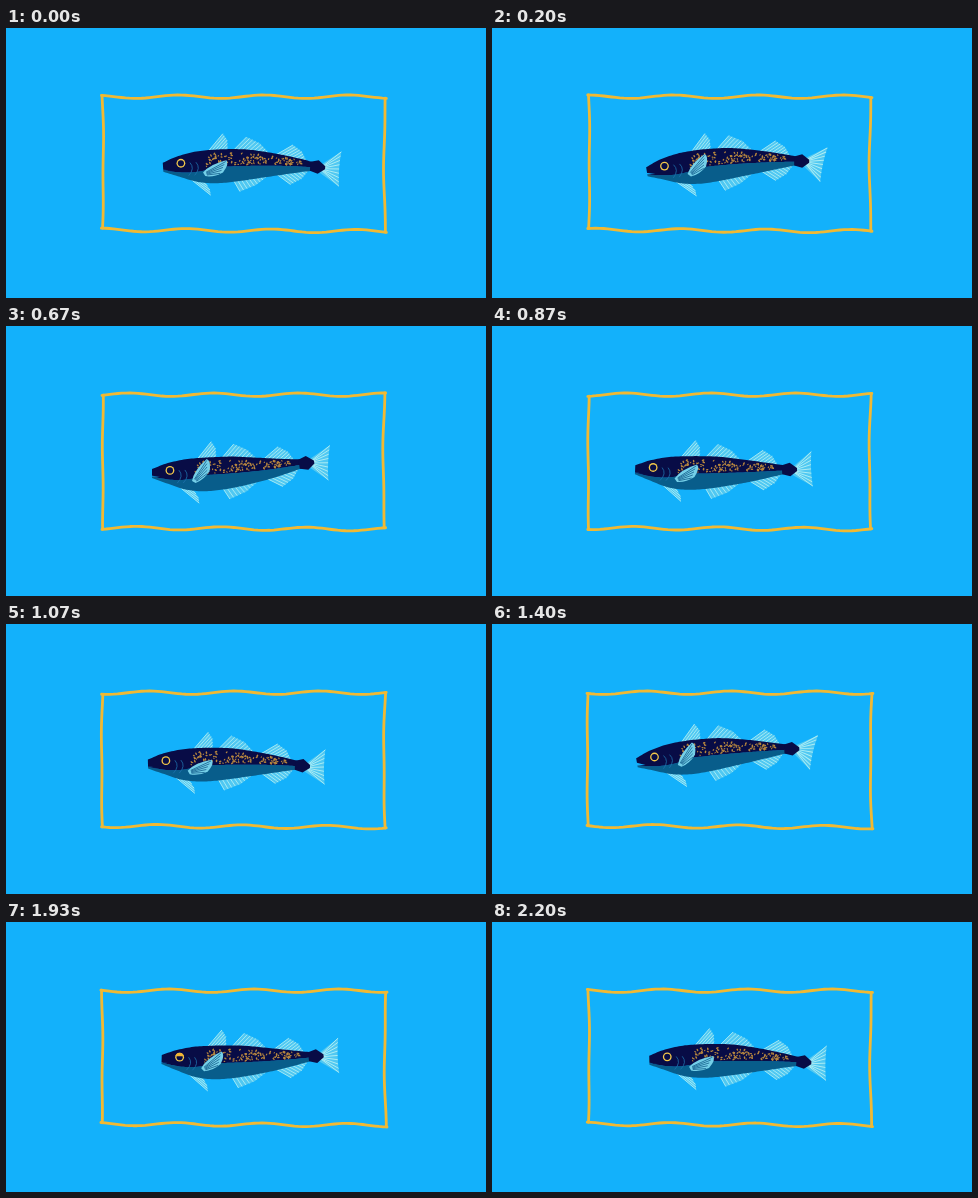
An HTML page with a canvas for the animation above (2270 ms loop, 480x270 px).

```html
<!DOCTYPE html>
<html lang="en">
<head>
<meta charset="utf-8">
<title>Swimming fish</title>
<style>
  html, body { margin: 0; width: 100%; height: 100%; overflow: hidden; background: #13b1fb; }
  canvas { display: block; width: 100vw; height: 100vh; }
</style>
</head>
<body>
<canvas id="stage"></canvas>
<script>
const W = 480, H = 270, LOOP = 2270, STEP = 200 / 3, LAST = 33, LENGTH = 161;
const SEA = '#13b1fb', NAVY = '#080c46', TEAL = '#085d8b', FIN = '#50c8f2',
  RAY = '#aeeef4', GOLD = '#f1b933', SPOT = '#b6863f';
const { sin, cos, PI } = Math;

const canvas = document.getElementById('stage');
const ctx = canvas.getContext('2d');

// Smooth curve through a few [x, y] points
function curve(points) {
  const end = points.length - 1;
  const slope = k => {
    const a = points[Math.max(0, k - 1)], b = points[Math.min(end, k + 1)];
    return (b[1] - a[1]) / (b[0] - a[0]);
  };
  return x => {
    let i = 0;
    while (i < end - 1 && x > points[i + 1][0]) i++;
    const [x0, y0] = points[i], [x1, y1] = points[i + 1];
    const h = x1 - x0, s = Math.min(1, Math.max(0, (x - x0) / h)), q = 1 - s;
    return y0 * (1 + 2 * s) * q * q + slope(i) * h * s * q * q +
      y1 * s * s * (3 - 2 * s) - slope(i + 1) * h * s * s * q;
  };
}

// Offsets from the spine by distance from the nose
const back = curve([[0, -6.5], [15, -12], [38, -16], [78, -16], [105, -12.5], [133, -7.5], [152, -3.8]]);
const belly = curve([[0, 2.5], [12, 7], [35, 15], [60, 17], [105, 12], [152, 4]]);
const flank = u => 0.9 + 4 * sin(PI * Math.min(u, 55) / 55);

function seeded(seed) {
  return () => (seed = seed * 16807 % 2147483647) / 2147483647;
}
const rnd = seeded(417);
const spots = Array.from({ length: 120 }, () => {
  const u = 43 + 96 * rnd();
  const top = back(u) * 0.76, low = flank(u) - 1.5;
  return { u, v: top + (low - top) * rnd(), r: 0.5 + 0.35 * rnd(), tilt: rnd() * 3 };
});

const range = (n, f) => Array.from({ length: n }, (_, i) => f(i / (n - 1), i));
const mix = (a, b, s) => [a[0] + (b[0] - a[0]) * s, a[1] + (b[1] - a[1]) * s];

// The fish drifts round an ellipse once per loop and beats its tail twice
function poseAt(w) {
  const beat = 2 * w;
  const x = 149.7 + 7.5 * cos(w) - 1.7 * sin(w);
  const bob = 4.8 * sin(w);
  const y = u => {
    const s = u / LENGTH;
    const sway = -2.2 + 8.5 * s ** 3;
    const lift = 0.8 - 7 * (1 - (1 - s) ** 2.5);
    return 143.5 - 10.5 * s + bob + sway * cos(beat) + lift * sin(beat);
  };
  const at = (u, v) => {
    const a = Math.max(0, u - 4), b = Math.min(LENGTH, u + 4);
    const m = (y(b) - y(a)) / (b - a);
    return [x + u - v * m, y(Math.min(LENGTH, Math.max(0, u))) + v];
  };
  return {
    at,
    pectoral: -37 + 19 * cos(beat) - 13 * sin(beat),
    tail: 4 + 8 * sin(beat - 0.17),
    gape: Math.max(0, sin(beat - 0.7))
  };
}

function trace(points, close) {
  ctx.beginPath();
  points.forEach(p => ctx.lineTo(p[0], p[1]));
  if (close) ctx.closePath();
}
function shape(points, color) {
  trace(points, true);
  ctx.fillStyle = color;
  ctx.fill();
}
function line(points, color, width) {
  trace(points);
  ctx.strokeStyle = color;
  ctx.lineWidth = width;
  ctx.stroke();
}
function disc(p, r, color) {
  ctx.beginPath();
  ctx.arc(p[0], p[1], r, 0, 2 * PI);
  ctx.fillStyle = color;
  ctx.fill();
}
function local(p, degrees, draw) {
  ctx.save();
  ctx.translate(p[0], p[1]);
  ctx.rotate(degrees * PI / 180);
  draw();
  ctx.restore();
}

function fin(at, edge, from, to, tipU, height, rays) {
  const side = Math.sign(edge(from));
  const root = u => at(u, edge(u) - side);
  const mid = (tipU + to) / 2;
  const tip = at(tipU, edge(tipU) + side * height);
  const bulge = at(mid + 2, edge(mid) + side * height * 0.58);
  const rim = s => s < 0.5 ? mix(tip, bulge, s * 2) : mix(bulge, root(to), s * 2 - 1);
  shape([root(from), tip, bulge, root(to), root((from + to) / 2)], FIN);
  for (let i = 0; i <= rays; i++) {
    const s = i / (rays + 1);
    line([root(from + (to - from) * s), rim(s)], RAY, 0.9);
  }
}

function tailFan() {
  ctx.beginPath();
  ctx.moveTo(-6, -1);
  ctx.lineTo(16.5, -17);
  ctx.quadraticCurveTo(14, 0, 15.5, 18);
  ctx.lineTo(-6, 4);
  ctx.fillStyle = FIN;
  ctx.fill();
  range(9, k => {
    const s = k * 2 - 1;
    line([[-2, s * 2 + 1], [15 + s * s - 0.4 * s, s * 17.2 + 0.5]], RAY, 0.95);
  });
}

function pectoralFin() {
  ctx.beginPath();
  ctx.moveTo(-1, 0);
  ctx.quadraticCurveTo(8, -6, 25, -4.5);
  ctx.quadraticCurveTo(27, 0, 18, 6);
  ctx.quadraticCurveTo(8, 8, 0, 4);
  ctx.fillStyle = '#74cfe8';
  ctx.fill();
  range(5, s => line([[2, 0.5 + 3 * s], [24 - 9 * s, 9.5 * s - 3.5]], '#17618f', 0.75));
}

function eye(p, lid) {
  disc(p, 4.4, '#f5c94a');
  disc(p, 3.1, NAVY);
  if (lid <= 0) return;
  ctx.save();
  ctx.beginPath();
  ctx.rect(p[0] - 5, p[1] - 5, 10, 2 + 6.4 * lid);
  ctx.clip();
  disc(p, 4.4, '#f3b533');
  ctx.restore();
}

function fish(w, step) {
  const { at, pectoral, tail, gape } = poseAt(w);
  const run = edge => range(77, (_, i) => at(i * 2, edge(i * 2)));

  local(at(LENGTH, 0.5), tail, tailFan);
  fin(at, back, 46, 65, 61, 15.5, 5);
  fin(at, back, 71, 106, 84, 12.5, 8);
  fin(at, back, 113, 143, 129, 12, 7);
  fin(at, belly, 70, 105, 76, 10.5, 8);
  fin(at, belly, 114, 146, 128, 11, 7);
  fin(at, belly, 27, 41, 46, 12, 3);

  const middle = run(flank).reverse();
  shape([...run(belly), ...middle], TEAL);
  shape([...run(back), ...middle], NAVY);
  shape([at(147, -4.4), at(155, -6.6), at(162, -1), at(162, 2), at(155, 7), at(147, 4.6)], NAVY);
  shape([at(-1, 0.5 - 4 * gape), at(8, 1.5), at(-1, 0.8)], SEA);

  for (const s of spots) {
    ctx.beginPath();
    ctx.ellipse(...at(s.u, s.v), s.r * 1.7, s.r, s.tilt, 0, 2 * PI);
    ctx.fillStyle = SPOT;
    ctx.fill();
  }
  for (const u of [27, 33]) {
    ctx.beginPath();
    ctx.moveTo(...at(u, -5));
    ctx.quadraticCurveTo(...at(u + 5, 1), ...at(u - 2, 8));
    ctx.strokeStyle = '#1f71ac';
    ctx.lineWidth = 0.8;
    ctx.stroke();
  }
  eye(at(18, -4.9), 1 - Math.abs(step - 27) / 3);
  local(at(40.5, 5.5), pectoral, pectoralFin);
}

// Wavy frame whose ripples travel one wavelength per loop
function border(w) {
  const drift = 85 * w / (2 * PI) + 8 * (1 - cos(w));
  const wave = (x, shift) => 1.7 * cos((x - shift - drift) / 85 * 2 * PI);
  const left = 96.4 + 0.6 * sin(w), right = 379.4 - 0.8 * sin(w);
  const top = x => 68.7 + wave(x, 215);
  const bottom = x => 202.6 + wave(x, 223) + (x - 240) / 200;
  const across = f => range(72, s => {
    const x = left - 1 + (right - left + 2) * s;
    return [x, f(x)];
  });
  const down = (x, bow) => range(30, s => {
    const y = top(x) + (bottom(x) - top(x)) * s;
    return [x + bow * sin(s * PI) + 0.4 * sin(y / 13 + w), y];
  });
  ctx.lineCap = ctx.lineJoin = 'round';
  for (const side of [across(top), across(bottom), down(left, cos(w)), down(right, -1.5)]) {
    line(side, GOLD, 2.8);
  }
  ctx.lineCap = 'butt';
}

function render(elapsed) {
  const width = Math.round(innerWidth * devicePixelRatio);
  const height = Math.round(innerHeight * devicePixelRatio);
  if (canvas.width !== width || canvas.height !== height) {
    canvas.width = width;
    canvas.height = height;
  }
  const step = Math.min(LAST, Math.floor((elapsed % LOOP + 3.5) / STEP));
  const w = step * STEP / LOOP * 2 * PI;
  ctx.setTransform(width / W, 0, 0, height / H, 0, 0);
  ctx.fillStyle = SEA;
  ctx.fillRect(0, 0, W, H);
  border(w);
  fish(w, step);
}

const start = performance.now();
function loop() {
  render(performance.now() - start);
  requestAnimationFrame(loop);
}
loop();
</script>
</body>
</html>
```
